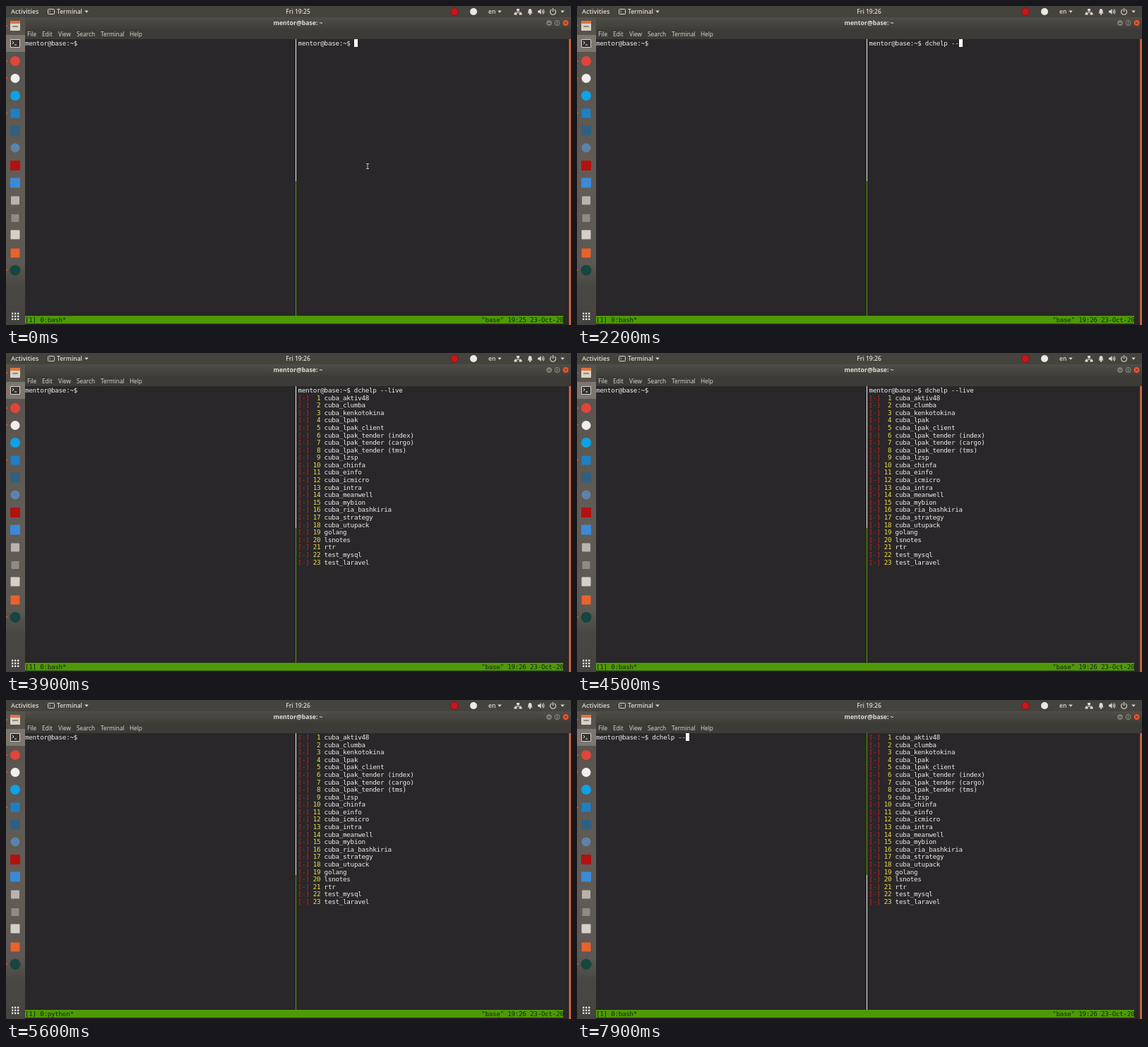
Write an HTML page that moves like this. It is 800x452 px and loops after 8000 ms.

```html
<!DOCTYPE html>
<html lang="en">
<head>
<meta charset="utf-8">
<style>
html, body { margin: 0; width: 800px; height: 452px; overflow: hidden; background: #292729; }
svg { display: block; }
text { white-space: pre; font: 8.3px "Open Sans", "Noto Sans", sans-serif; fill: #dfdbd2; }
.bar text { font-size: 8.5px; font-weight: 600; }
.term text { font: 9.2px "DejaVu Sans Mono", monospace; letter-spacing: -.246px; fill: #eeeeec; }
.term .status { fill: #17250b; }
.term .off { fill: #d62020; }
.term .num { fill: #f2e24b; }
</style>
</head>
<body>
<svg width="800" height="452" viewBox="0 0 800 452">
  <defs>
    <linearGradient id="dockFill" x2="0" y2="1">
      <stop stop-color="#57524c"/><stop offset=".5" stop-color="#625c56"/>
      <stop offset=".8" stop-color="#5c5853"/><stop offset=".87" stop-color="#4a4845"/>
      <stop offset="1" stop-color="#454340"/>
    </linearGradient>
    <linearGradient id="titleFill" x2="0" y2="1">
      <stop stop-color="#504e48"/><stop offset="1" stop-color="#3f3d39"/>
    </linearGradient>
    <path id="caret" d="M-2.7-1.5H2.7L0 1.7Z" fill="#dfdbd2"/>
  </defs>

  <rect width="800" height="452" fill="#292729"/>
  <rect x="797" y="47" width="3" height="405" fill="#c9623c"/>
  <rect y="15" width="27" height="437" fill="url(#dockFill)"/>
  <g id="dock"></g>

  <g class="bar">
    <rect width="800" height="16" fill="#45433e"/>
    <text x="7" y="11" style="font-size:9px">Activities</text>
    <rect x="59.5" y="4.5" width="9" height="7" rx="1" fill="#45433e" stroke="#dfdbd2"/>
    <path d="M61.500 6.500l1.500 1.300-1.500 1.300" fill="none" stroke="#dfdbd2" stroke-width=".8"/>
    <text x="72" y="11">Terminal</text>
    <use href="#caret" x="114" y="8"/>
    <text id="clock" x="413.5" y="11" text-anchor="middle"></text>
    <circle cx="635" cy="8" r="5.500" fill="#c8151b" stroke="#6e1c1a"/>
    <circle cx="662" cy="8" r="5" fill="#eceae6"/>
    <text x="683" y="11">en</text>
    <use href="#caret" x="699" y="8"/>
    <g fill="#dfdbd2">
      <path d="M723 4h4v3h-1.500v1.500h4V10h1v2.500h-4V10h2v-.6h-7V10h2v2.500h-4V10h1V8.500h4V7H723Z"/>
      <path d="M738.500 10.500c1-1 1-2 1-3.500 0-4 5-4 5 0 0 1.500 0 2.500 1 3.500Z"/><circle cx="742" cy="11.500" r="1.200"/>
      <path d="M753 6.500h2l2.500-2.500v8l-2.500-2.500h-2Z"/>
    </g>
    <path d="M759 6q1.500 2 0 4M760.500 4.500q2.500 3.500 0 7M774.500 3v5M772.500 5a3.900 3.900 0 1 0 4 0"
      fill="none" stroke="#dfdbd2" stroke-width="1.100"/>
    <use href="#caret" x="788" y="8"/>
  </g>

  <rect x="27" y="16" width="773" height="17" fill="url(#titleFill)"/>
  <rect x="27" y="33" width="773" height="14" fill="#3d3b37"/>
  <text id="title" x="413.500" y="27" text-anchor="middle" style="font-size:8.7px;font-weight:700"></text>
  <g fill="#7d7a71" stroke="#34322e" stroke-width=".6">
    <circle cx="769" cy="24" r="4.500"/><circle cx="780.500" cy="24" r="4.500"/>
    <circle cx="792.500" cy="24" r="4.500" fill="#e9562c"/>
  </g>
  <path d="M767 24.500h4M778.500 22.500h4v3h-4ZM791 22.500l3 3m0-3l-3 3" fill="none" stroke="#34322e" stroke-width=".9"/>
  <g id="menu"></g>

  <g class="term">
    <rect id="edgeTop" x="410" y="47" width="1" height="201"/>
    <rect id="edgeLow" x="410" y="248" width="1" height="191"/>
    <text id="left" x="27" y="56"></text>
    <text id="right" x="413.600" y="56"></text>
    <g id="list"></g>
    <rect id="cursor" width="5" height="11" fill="#fff"/>
    <rect x="27" y="439" width="762" height="11" fill="#4e9a06"/>
    <text id="job" class="status" x="27" y="448"></text>
    <text id="stamp" class="status" x="673.200" y="448"></text>
  </g>
  <path id="pointer" d="M510 223.500h4M512 224v6M510 230.500h4" fill="none" stroke="#d8d8d8" stroke-width=".9"/>
</svg>

<script>
const $ = id => document.getElementById(id);
const CELL = 5.29, ROW = 10.59, LEFT = 27, RIGHT = 413.6;
const HOST = "mentor@base", PROMPT = HOST + ":~$ ", COMMAND = "dchelp --live";

// Moments at which each character of the command is typed
const rightKeys = [650, 1200, 1300, 1500, 1700, 1800, 1900, 2000, 2200, 2700, 2900, 3200, 3300];
const leftKeys = [6500, 6600, 6700, 6800, 6900, 7000, 7500, 7600, 7700];
const CLOCK = 400, STAMP = 1500, ENTER = 3500, LIST = 3800, LIVE = 4700, SWITCH = 5700;

const projects = `cuba_aktiv48,cuba_clumba,cuba_kenkotokina,cuba_lpak,cuba_lpak_client,
cuba_lpak_tender (index),cuba_lpak_tender (cargo),cuba_lpak_tender (tms),cuba_lzsp,
cuba_chinfa,cuba_einfo,cuba_icmicro,cuba_intra,cuba_meanwell,cuba_mybion,
cuba_ria_bashkiria,cuba_strategy,cuba_utupack,golang,lsnotes,rtr,test_mysql,
test_laravel`.replace(/\n/g, "").split(",");

$("title").textContent = HOST + ": ~";
$("menu").innerHTML = [[30, "File"], [51, "Edit"], [74, "View"], [100, "Search"], [134, "Terminal"], [175, "Help"]]
  .map(([x, label]) => `<text x="${x}" y="43">${label}</text>`).join("");
$("list").innerHTML = projects.map((name, i) =>
  `<text x="${RIGHT}" y="${56 + ROW * (i + 1)}"><tspan class="off">[-]</tspan> ` +
  `<tspan class="num">${String(i + 1).padStart(2)}</tspan> ${name}</text>`).join("");

function drawDock() {
  const rect = (x, y, w, h, fill, rx = 1) =>
    `<rect x="${x}" y="${y}" width="${w}" height="${h}" rx="${rx}" fill="${fill}"/>`;
  const disc = (x, y, r, fill) => `<circle cx="${x}" cy="${y}" r="${r}" fill="${fill}"/>`;
  const square = (y, fill, size = 14) => rect(13 - size / 2, y - size / 2, size, size, fill);
  let out = rect(0, 41, 27, 24, "#7b766f", 0);
  out += rect(6, 21, 14, 14, "#d9d2c6") + rect(6, 21, 14, 4, "#e2743a") + rect(9, 28, 8, 2, "#8f877b");
  out += rect(6, 47, 14, 12, "#d5d1ca") + rect(7, 48, 12, 10, "#33302f", 0) +
    `<path d="M9 50l2 2-2 2M12 55h3" fill="none" stroke="#eee"/>`;
  out += disc(13, 78, 7, "#e0453a") + disc(13, 102.5, 6.5, "#f1eef0") + disc(13, 127, 7, "#0da2e6");
  out += square(152, "#1e7fc4", 13) + square(176.5, "#31607f") + disc(13, 201, 6.5, "#5c83ab");
  out += square(226, "#b3110e") + square(250.5, "#3b8ad8") + square(275.5, "#b9b3ad", 12);
  out += square(300.5, "#8e8b86", 11) + square(324, "#d4d0c8", 13) + square(350, "#e8622c", 13);
  out += disc(13, 374.5, 7.5, "#174540");
  for (const y of [28, 53, 78, 102, 152, 374]) out += disc(1, y, 1.1, "#e95420");
  for (let i = 0; i < 9; i++) out += rect(8 + i % 3 * 4, 434.5 + Math.floor(i / 3) * 4, 2.4, 2.4, "#eceae6", .6);
  $("dock").innerHTML = out;
}

const typed = (keys, t) => COMMAND.slice(0, keys.filter(k => k <= t).length);
const show = (id, on) => $(id).setAttribute("visibility", on ? "visible" : "hidden");

function draw() {
  const t = performance.now() % 8000;
  const onLeft = t >= SWITCH, live = t >= LIVE;
  const leftText = PROMPT + typed(leftKeys, t), rightText = PROMPT + typed(rightKeys, t);

  $("clock").textContent = t < CLOCK ? "Fri 19:25" : "Fri 19:26";
  $("stamp").textContent = `"base" 19:2${t < STAMP ? 5 : 6} 23-Oct-20`;
  $("job").textContent = live && !onLeft ? "[1] 0:python*" : "[1] 0:bash*";
  $("left").textContent = leftText;
  $("right").textContent = live ? "" : rightText;
  $("edgeTop").setAttribute("fill", onLeft ? "#4e9a06" : "#eeeeec");
  $("edgeLow").setAttribute("fill", onLeft ? "#eeeeec" : "#4e9a06");

  show("list", t >= LIST);
  $("list").setAttribute("transform", `translate(0 ${live ? -ROW : 0})`);

  const entered = t >= ENTER && !onLeft;
  const column = entered ? 0 : (onLeft ? leftText : rightText).length;
  show("cursor", t < LIST || onLeft);
  $("cursor").setAttribute("x", Math.round((onLeft ? LEFT : RIGHT) + column * CELL));
  $("cursor").setAttribute("y", entered ? 58 : 47);
  show("pointer", t < rightKeys[0]);
  requestAnimationFrame(draw);
}

drawDock();
draw();
</script>
</body>
</html>
```
